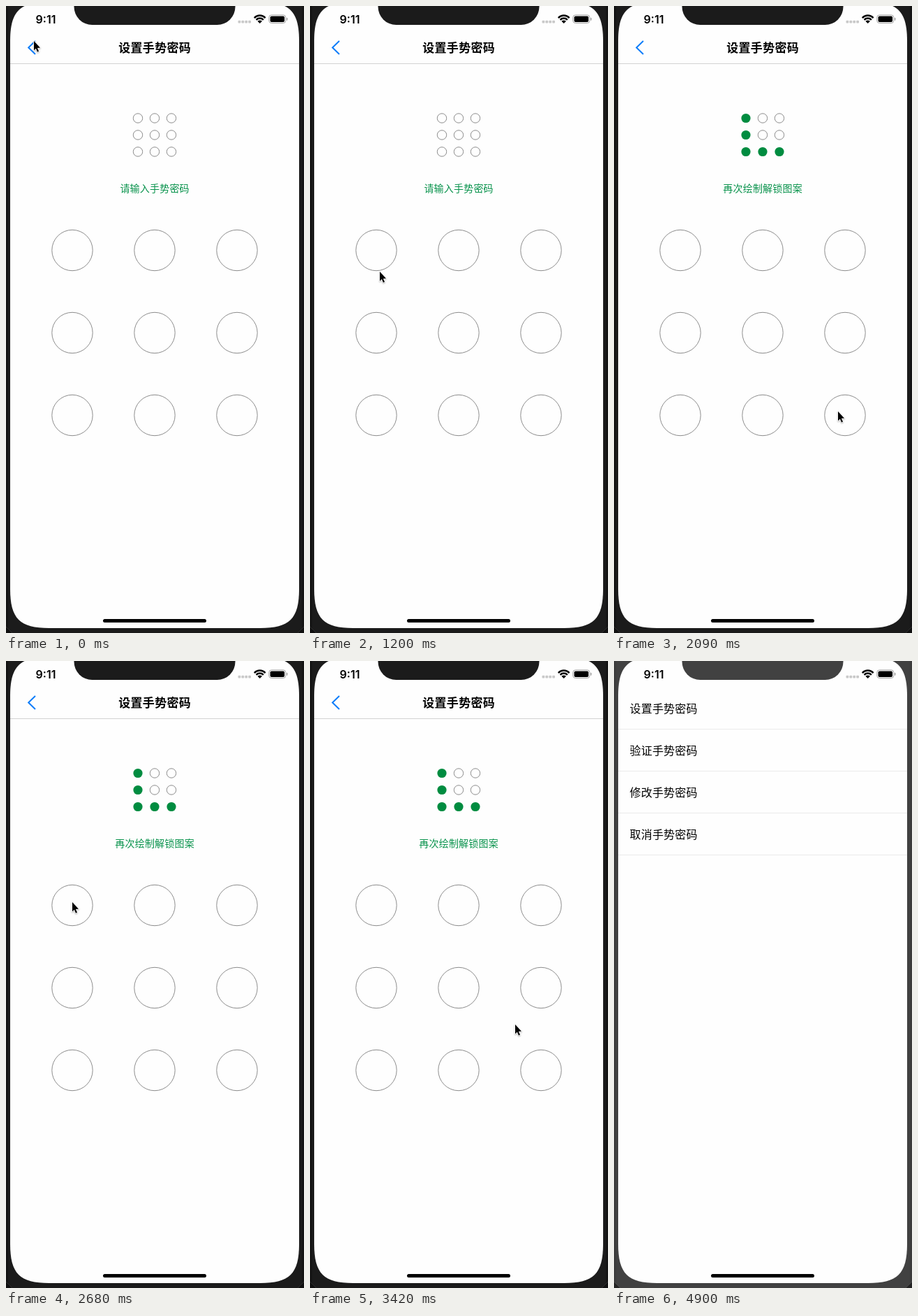
These frames come from a looping animation (427x897 px, 5000 ms). An HTML page with a canvas:

```html
<!DOCTYPE html>
<html lang="zh">
<head>
<meta charset="utf-8">
<title>设置手势密码</title>
<style>
html, body { margin: 0; width: 100%; height: 100%; overflow: hidden; background: #1b1b1b; }
canvas { display: block; width: 427px; height: 897px; }
</style>
</head>
<body>
<canvas id="stage"></canvas>
<script>
const W = 427, H = 897, LOOP = 5000;
const GREEN = '#008c40', GREY = '#8c8c8c', WHITE = '#fefefe';
const CJK = '"Noto Sans CJK SC", "Noto Sans CJK", sans-serif';
const PATTERN = [0, 3, 6, 7, 8];

// The picture advances in ticks; every time below is counted in them.
const TICK = 148.4;
const PRESS = [9, 18], HOLD = 5;
const CONFIRM = 14, DISMISS = 24, LIST = 27, FLASH = 33;
const LAG = .6, REACH = 30;

// pointer route: tick, x, y
const ROUTE = [
  [0, 40, 50], [1, 36, 56], [4, 36, 56], [8, 100, 380],
  [9, 95, 345], [11, 92, 596], [12, 329, 587], [14, 321, 580],
  [18, 95, 345], [20, 92, 596], [21, 284, 594], [22, 330, 578], [23, 294, 520]
];

const canvas = document.getElementById('stage');
const ratio = window.devicePixelRatio || 1;
canvas.width = W * ratio;
canvas.height = H * ratio;
const c = canvas.getContext('2d');

function pointerAt(k) {
  const next = ROUTE.findIndex(p => p[0] > k);
  if (next < 0) return ROUTE[ROUTE.length - 1].slice(1);
  const [t0, x0, y0] = ROUTE[next - 1], [t1, x1, y1] = ROUTE[next];
  const p = (k - t0) / (t1 - t0);
  return [x0 + (x1 - x0) * p, y0 + (y1 - y0) * p];
}

const node = i => [95 + i % 3 * 118, 349.5 + Math.floor(i / 3) * 118];

// The drawn line trails the pointer and picks up each node it comes near.
function strokeAt(k) {
  const press = PRESS.find(p => k >= p && k < p + HOLD);
  const end = k - LAG;
  let count = 0;
  for (let s = press; s <= end && count < PATTERN.length; s += .05) {
    const [x, y] = pointerAt(s), [u, v] = node(PATTERN[count]);
    if (Math.hypot(x - u, y - v) < REACH) count++;
  }
  const picked = PATTERN.slice(0, count);
  const points = picked.map(node);
  if (count && count < PATTERN.length) points.push(pointerAt(end));
  return { picked, points };
}

function rect(x, y, w, h, color, r = 0) {
  c.fillStyle = color;
  c.beginPath();
  c.roundRect(x, y, w, h, r);
  c.fill();
}

function line(points, color, width = 1) {
  c.strokeStyle = color;
  c.lineWidth = width;
  c.beginPath();
  points.forEach(p => c.lineTo(...p));
  c.stroke();
}

function circle(x, y, r, color, filled) {
  c.beginPath();
  c.arc(x, y, r, 0, Math.PI * 2);
  c[filled ? 'fillStyle' : 'strokeStyle'] = color;
  c.lineWidth = 1;
  filled ? c.fill() : c.stroke();
}

function label(str, x, y, font, color, spacing = 0, align = 'left') {
  c.font = font;
  c.letterSpacing = spacing + 'px';
  c.textAlign = align;
  c.fillStyle = color;
  c.fillText(str, x + (align === 'center' ? spacing / 2 : 0), y);
}

function arrow(from, to) {
  const [x, y] = node(from), [u, v] = node(to);
  c.save();
  c.translate(x, y);
  c.rotate(Math.atan2(v - y, u - x));
  c.fillStyle = GREEN;
  c.beginPath();
  c.moveTo(15, -5);
  c.lineTo(20, 0);
  c.lineTo(15, 5);
  c.fill();
  c.restore();
}

function drawGrid({ picked, points }) {
  for (let i = 0; i < 9; i++) {
    const on = picked.includes(i);
    circle(...node(i), 29.2, on ? GREEN : GREY);
    if (on) circle(...node(i), 11, GREEN, true);
  }
  line(points, GREEN);
  for (let i = 1; i < picked.length; i++) arrow(picked[i - 1], picked[i]);
}

function drawSetup(k) {
  rect(6, -6, 414, 896, WHITE);
  line([[42, 50], [32.2, 59.5], [42, 69]], '#0b7dfa', 2);
  label('设置手势密码', 213, 66.2, '600 17px ' + CJK, '#000', .3, 'center');
  rect(6, 82, 414, 1, '#d2d2d2');

  const confirm = k >= CONFIRM;
  for (let i = 0; i < 9; i++) {
    const x = 189 + i % 3 * 24, y = 160.5 + Math.floor(i / 3) * 24;
    if (confirm && PATTERN.includes(i)) circle(x, y, 6.6, GREEN, true);
    else circle(x, y, 6.7, GREY);
  }
  label(confirm ? '再次绘制解锁图案' : '请输入手势密码', 213, 266,
    '400 14px ' + CJK, '#07924b', .2, 'center');
  drawGrid(strokeAt(k));
}

function drawList() {
  rect(6, -6, 414, 896, WHITE);
  ['设置', '验证', '修改', '取消'].forEach((verb, i) => {
    label(verb + '手势密码', 22.5, 74 + i * 60, '400 16px ' + CJK, '#000', .2);
    rect(6, 97 + i * 60, 414, 1, '#ebebeb');
  });
}

function drawStatus() {
  label('9:11', 42.6, 24.5, '600 16px Inter, sans-serif', '#000');
  for (let i = 0; i < 4; i++) rect(332.5 + i * 4.9, 20.7, 3.8, 3.8, '#c9c9c9', 1);

  // wifi fan
  c.save();
  c.beginPath();
  c.moveTo(363.7, 25);
  c.lineTo(353, 14.3);
  c.lineTo(353, 8);
  c.lineTo(374.4, 8);
  c.lineTo(374.4, 14.3);
  c.clip();
  c.strokeStyle = '#000';
  c.lineWidth = 2.5;
  [10.9, 7].forEach(r => {
    c.beginPath();
    c.arc(363.7, 24.5, r, Math.PI, 0);
    c.stroke();
  });
  circle(363.7, 24.5, 4, '#000', true);
  c.restore();

  c.strokeStyle = '#a3a3a3';
  c.lineWidth = 1;
  c.beginPath();
  c.roundRect(376.8, 12.9, 24, 11.6, 3.5);
  c.stroke();
  rect(378.5, 14.5, 20.6, 8.4, '#000', 2);
  rect(402, 16.8, 1.4, 4, '#a3a3a3', 1);
}

function drawBezel(flash) {
  const body = flash ? '#414141' : '#1b1b1b';
  const edge = flash ? '#3c3c3c' : '#141414';
  rect(0, 0, W, H, body);
  rect(0, 0, 3, H, edge);
  rect(W - 3, 0, 3, H, edge);
  [[0, 1], [W, -1]].forEach(([x, dir]) => {
    c.fillStyle = flash ? '#242424' : '#101010';
    c.beginPath();
    c.moveTo(x, H - 9);
    c.lineTo(x + dir * 9, H);
    c.lineTo(x, H);
    c.fill();
    line([[x, H - 9], [x + dir * 9, H]], flash ? '#505050' : '#333', .8);
  });
  return body;
}

// Rounded screen whose corners flow gradually into the sides.
function screenPath() {
  const left = 6, top = -6, right = 420, bottom = 890, reach = 56, bend = 13.6;
  c.beginPath();
  [[left, top, 1, 1], [left, bottom, 1, -1], [right, bottom, -1, -1], [right, top, -1, 1]]
    .forEach(([x, y, sx, sy]) => {
      const onTop = d => [x + sx * d, y], onSide = d => [x, y + sy * d];
      const [a, b] = sx === sy ? [onTop, onSide] : [onSide, onTop];
      c.lineTo(...a(reach));
      c.bezierCurveTo(...a(bend), ...b(bend), ...b(reach));
    });
  c.closePath();
}

function drawPointer([x, y]) {
  c.save();
  c.translate(x, y);
  c.scale(.9, .95);
  c.beginPath();
  [[0, 0], [0, 14.2], [3.2, 11.2], [5.5, 16.5], [7.8, 15.5], [5.5, 10.4], [10, 10.2]]
    .forEach(p => c.lineTo(...p));
  c.closePath();
  c.shadowColor = 'rgba(0,0,0,.3)';
  c.shadowBlur = 2 * ratio;
  c.shadowOffsetY = ratio;
  c.strokeStyle = '#fff';
  c.lineWidth = 1.8;
  c.lineJoin = 'round';
  c.stroke();
  c.shadowColor = 'transparent';
  c.fillStyle = '#000';
  c.fill();
  c.restore();
}

function draw(t) {
  const k = Math.floor(t / TICK);
  c.setTransform(ratio, 0, 0, ratio, 0, 0);
  const body = drawBezel(k >= FLASH);

  c.save();
  screenPath();
  c.clip();
  if (k > DISMISS) drawList();
  if (k < LIST) {
    const p = Math.max(0, (k - DISMISS) / (LIST - DISMISS));
    c.save();
    c.translate(0, 896 * Math.sin(p * Math.PI / 2));
    drawSetup(k);
    c.restore();
  }
  drawStatus();
  rect(139, 877, 148, 5, '#000', 2.5);
  c.restore();

  rect(97.5, -30, 231, 57, body, 26);
  if (k <= DISMISS) drawPointer(pointerAt(k));
}

const start = performance.now();
function tick() {
  draw((performance.now() - start) % LOOP);
  requestAnimationFrame(tick);
}
tick();
</script>
</body>
</html>
```
